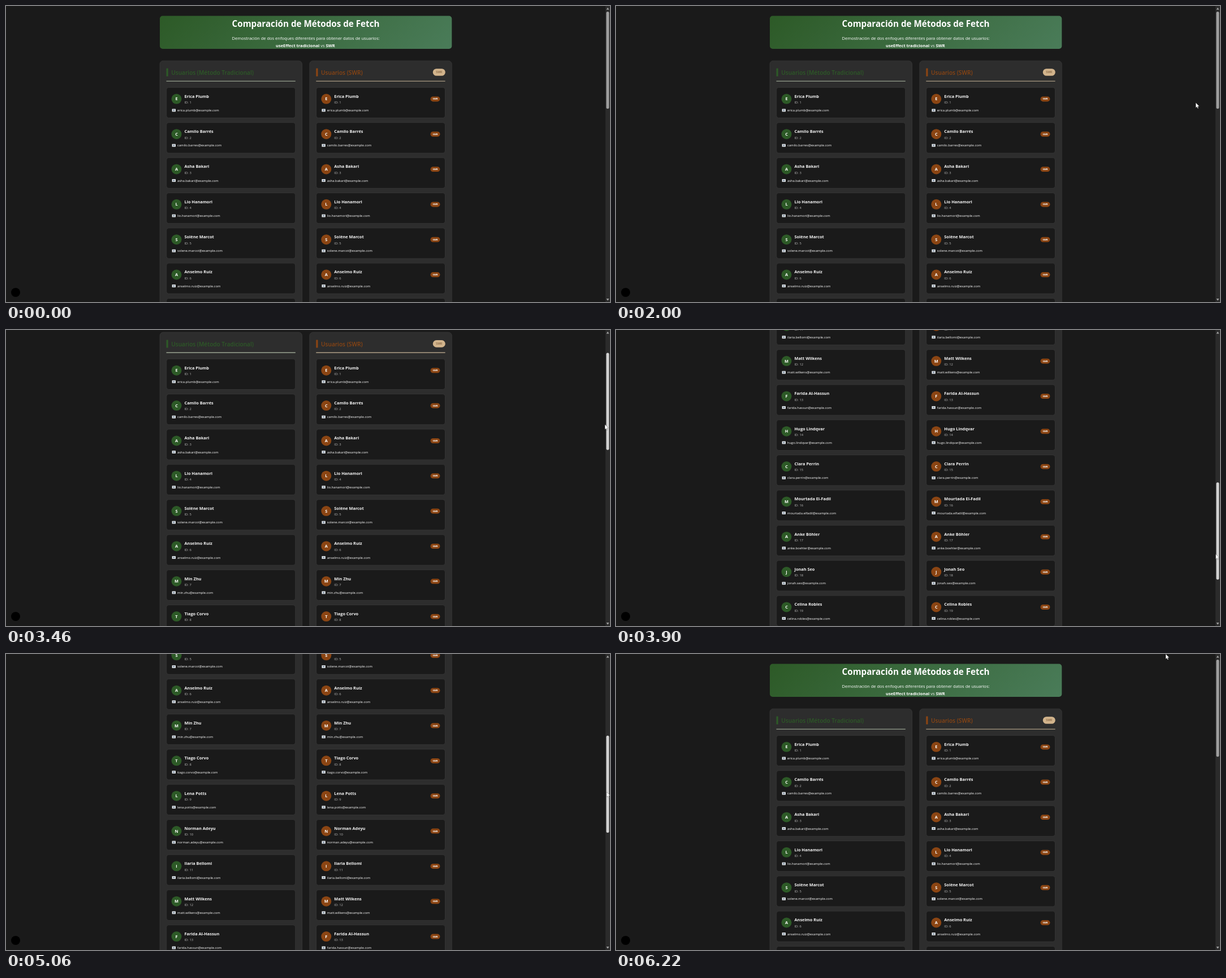
An HTML page with a canvas for the animation above (6300 ms loop, 1068 px wide and 525 px high).

```html
<!DOCTYPE html>
<html lang="es">
<head>
<meta charset="utf-8">
<title>Comparación de Métodos de Fetch</title>
<style>
html, body { margin: 0; width: 100%; height: 100%; overflow: hidden; background: #1a1a1a; }
canvas { display: block; width: 1068px; height: 525px; }
</style>
</head>
<body>
<canvas id="stage" width="1068" height="525"></canvas>
<script>
const ctx = document.getElementById('stage').getContext('2d');
const W = 1068, H = 525, LOOP = 6300;
const LOADING = [2240, 3080];
const MAX_SCROLL = 1017.4, ROW = 62.34, COLUMN_GAP = 264.8;
const BG = '#1a1a1a', PANEL = '#2d2d2d', LINE = '#3b3b3b';
const GREEN = '#2d5a27', BROWN = '#8b4513', TAN = '#d2b48c';

const users = [
  'Erica Plumb', 'Camilo Barrés', 'Asha Bakari', 'Lio Hanamori', 'Solène Marcot',
  'Anselmo Ruíz', 'Min Zhu', 'Tiago Corvo', 'Lena Potts', 'Norman Adeyu',
  'Ilaria Bellomi', 'Matt Wilkens', 'Farida Al-Hassun', 'Hugo Lindqvar', 'Clara Perrin',
  'Mourtada El-Fadil', 'Anke Böhler', 'Jonah Seo', 'Celina Robles', 'Derek Welby'
].map(name => ({ name, email: emailFor(name) }));

const features = [
  ['useEffect Tradicional', GREEN, ['Control manual del estado', 'Gestión explícita de loading/error',
    'Sin caché automático', 'Re-fetch manual necesario']],
  ['SWR', BROWN, ['Caché automático inteligente', 'Revalidación en foco',
    'Menos código boilerplate', 'Mejor experiencia de usuario']]
];

// Keyframes: time followed by values
const scrollKeys = [[3360, 0], [3460, 91.5], [4040, MAX_SCROLL], [4560, MAX_SCROLL], [5060, 412.8], [5500, 0]];
const cursorKeys = [
  [960, 985, -14], [1260, 997, 178], [1660, 1004, 188], [2240, 1040, 160], [2800, 1066, 132],
  [3080, 1066, 138], [3360, 1060, 137], [3460, 1059, 167], [4040, 1061, 470], [4440, 1061, 496],
  [4560, 1062, 444], [5060, 1062, 245], [5500, 1062, 110], [5720, 984, 50], [5900, 976, 24], [6220, 972, 0]
];

function emailFor(name) {
  const [first, last] = name.toLowerCase().replace('ö', 'oe').normalize('NFD')
    .replace(/[\u0300-\u036f]/g, '').replace('al-', '').replace('-', '').split(' ');
  return `${first}.${last}@example.com`;
}

function track(keys, t) {
  if (t <= keys[0][0]) return keys[0].slice(1);
  const next = keys.findIndex(k => k[0] > t);
  if (next < 0) return keys[keys.length - 1].slice(1);
  const a = keys[next - 1], b = keys[next], p = (t - a[0]) / (b[0] - a[0]);
  return a.slice(1).map((v, i) => v + (b[i + 1] - v) * p);
}

function box(x, y, w, h, r, fill, stroke) {
  ctx.beginPath();
  ctx.roundRect(x, y, w, h, r);
  ctx.fillStyle = fill;
  ctx.fill();
  if (stroke) {
    ctx.strokeStyle = stroke;
    ctx.lineWidth = 0.7;
    ctx.stroke();
  }
}

function disc(x, y, r, fill) {
  ctx.beginPath();
  ctx.arc(x, y, r, 0, Math.PI * 2);
  ctx.fillStyle = fill;
  ctx.fill();
}

function polygon(points, fill) {
  ctx.beginPath();
  points.forEach(([x, y]) => ctx.lineTo(x, y));
  ctx.closePath();
  ctx.fillStyle = fill;
  ctx.fill();
}

// y is the middle of the capitals
function text(str, x, y, size, color, weight = 400, align = 'left') {
  ctx.font = `${weight} ${size}px "Open Sans", "Noto Sans", sans-serif`;
  ctx.textAlign = align;
  ctx.fillStyle = color;
  ctx.fillText(str, x, y + size * 0.36);
  return ctx.measureText(str).width;
}

function drawHeader() {
  const fill = ctx.createLinearGradient(386.5, -96.5, 673.5, 190.5);
  fill.addColorStop(0, GREEN);
  fill.addColorStop(1, '#4a7c59');
  box(272, 17.5, 516.3, 58.5, 5, fill);
  text('Comparación de Métodos de Fetch', 530, 31.5, 15.2, '#fff', 700, 'center');
  text('Demostración de dos enfoques diferentes para obtener datos de usuarios:', 530, 57.3, 7.53, '#fff', 400, 'center');
  let x = 477;
  x += text('useEffect tradicional', x, 70, 7.5, '#fff', 700);
  x += text(' vs ', x, 70, 7.5, '#f0f3ef');
  text('SWR', x, 70, 7.5, '#fff', 700);
}

function drawCard(user, i, y, accent, badge) {
  box(283.7, y, 228, 54.2, 4, BG, LINE);
  disc(301.5, y + 20.4, 9, accent);
  text(user.name[0], 301.5, y + 20.4, 7.4, '#fff', 700, 'center');
  text(user.name, 315.5, y + 15.7, 7.35, '#f4f4f4', 700);
  text(`ID: ${i + 1}`, 315.5, y + 26.7, 5.8, '#bcbcbc');
  box(293.6, y + 38, 6.4, 5, 0.5, '#dfe3e6');
  box(295.6, y + 39.2, 2.4, 2.6, 0.3, '#75869a');
  text(user.email, 303, y + 40.5, 5.8, '#fff', 500);
  if (badge) {
    box(485.7, y + 16, 17, 9, 4.5, accent);
    text('SWR', 494.2, y + 20.5, 4.2, '#fff', 700, 'center');
  }
}

function drawColumn(x, title, accent, rule, badge, scroll) {
  ctx.save();
  ctx.translate(x, 0);
  box(272, 97.2, 251.5, 1296.7, 6, PANEL, LINE);
  box(283.5, 110.5, 3.2, 14.2, 0.5, accent);
  text(title, 292.3, 118.2, 10.1, accent, 600);
  box(283.5, 132.7, 228.3, 1.1, 0, rule);
  if (badge) {
    box(490, 111.2, 22, 12.6, 6.3, TAN);
    text('SWR', 501, 117.5, 5.2, '#6b4a2a', 400, 'center');
  }
  users.forEach((user, i) => {
    const y = 144.4 + i * ROW;
    if (y + 56 > scroll && y < scroll + H) drawCard(user, i, y, accent, badge);
  });
  ctx.restore();
}

function drawFeatures(top) {
  box(272, top, 516.3, 98, 5, PANEL, LINE);
  box(462.3, top + 19, 2.4, 4, 0.8, '#a9a9a0');
  disc(463.5, top + 17.2, 3, '#f1e3b0');
  text('Características de cada método', 472, top + 18.4, 8.5, GREEN, 600);
  features.forEach(([title, color, items], col) => {
    const x = 284 + col * 252;
    text(title, x, top + 37.6, 6.5, color, 600);
    items.forEach((item, i) => {
      const y = top + 52.2 + i * 10;
      disc(x + 1.4, y, 1.1, '#d8d8d8');
      text(item, x + 8, y, 5.88, '#dadada');
    });
  });
}

function drawSpinner(x, label, labelX, color, t) {
  const angle = (t - 2800) / 1000 * Math.PI * 2;
  const ring = (from, to, stroke) => {
    ctx.beginPath();
    ctx.arc(x, 142.4, 8, from, to);
    ctx.strokeStyle = stroke;
    ctx.lineWidth = 1.5;
    ctx.stroke();
  };
  ring(0, Math.PI * 2, '#454545');
  ring(angle - 0.85, angle + 0.85, color);
  text(label, labelX, 142.4, 6.7, '#d8d8d8');
}

function drawLoading(t) {
  box(272, 97.2, 251, 90, 5, PANEL, LINE);
  box(537.3, 97.2, 251, 90, 5, PANEL, LINE);
  drawSpinner(363.5, 'Cargando usuarios...', 377, GREEN, t);
  drawSpinner(614, 'Cargando usuarios con SWR...', 627.3, BROWN, t);
  drawFeatures(209);
}

function drawScrollbar(scroll, held) {
  box(1060, 0, 8, H, 0, '#2b2b2b');
  box(1061.4, 10 + scroll / MAX_SCROLL * 333, 5, 172.3, 2.5, held ? '#d2d2d2' : '#9f9f9f');
  polygon([[1061.5, 6.5], [1064, 2.8], [1066.5, 6.5]], '#9f9f9f');
  polygon([[1061.5, 519], [1064, 522.7], [1066.5, 519]], '#9f9f9f');
}

function drawCursor(x, y) {
  const shape = [[0, 0], [0, 9], [2, 7.2], [3.4, 10.2], [4.8, 9.6], [3.5, 6.6], [6.2, 6.4]];
  polygon(shape.map(([dx, dy]) => [x + dx, y + dy]), '#fff');
  ctx.strokeStyle = '#0008';
  ctx.lineWidth = 0.5;
  ctx.stroke();
}

function render(t) {
  const loading = t >= LOADING[0] && t < LOADING[1];
  const [scroll] = track(scrollKeys, t);
  ctx.fillStyle = BG;
  ctx.fillRect(0, 0, W, H);

  ctx.save();
  ctx.translate(loading ? 4 : 0, -scroll);
  drawHeader();
  if (loading) {
    drawLoading(t);
  } else {
    drawColumn(0, 'Usuarios (Método Tradicional)', GREEN, '#b0bca6', false, scroll);
    drawColumn(COLUMN_GAP, 'Usuarios (SWR)', BROWN, '#c8b698', true, scroll);
    drawFeatures(1426.5);
  }
  ctx.restore();

  disc(17, 508, 8, '#000');
  if (!loading) drawScrollbar(scroll, t > 3340 && t < 5520);
  if (t >= cursorKeys[0][0]) drawCursor(...track(cursorKeys, t));
}

function tick() {
  render(performance.now() % LOOP);
  requestAnimationFrame(tick);
}
tick();
</script>
</body>
</html>
```
